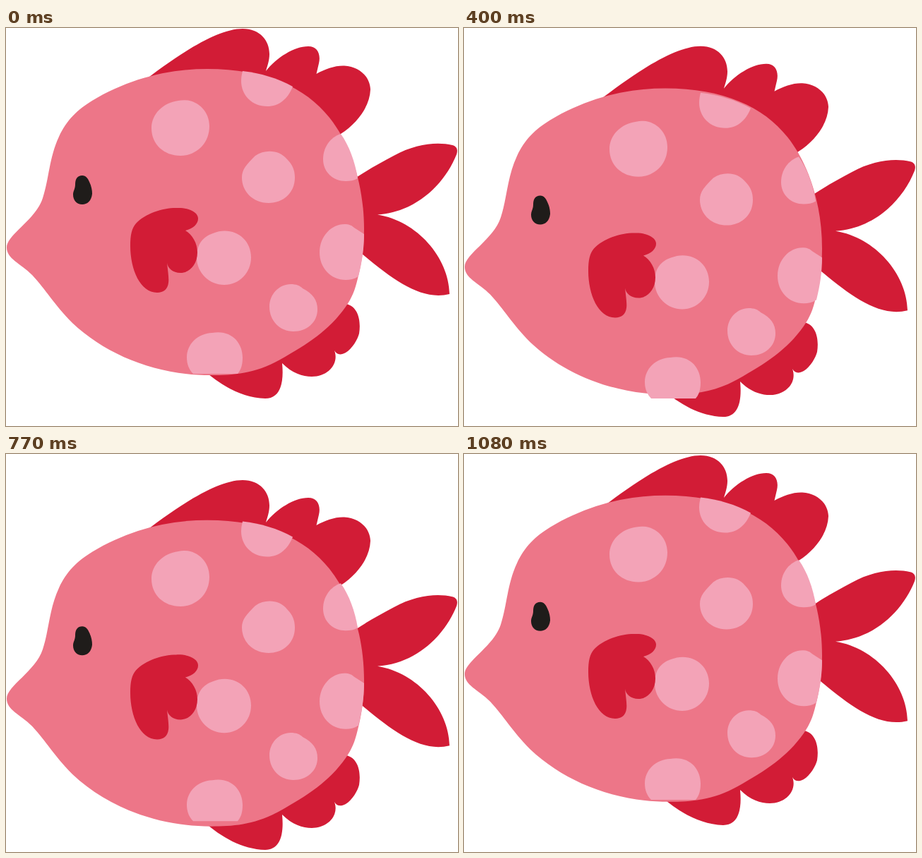
Write an HTML page that moves like this. It is 640 px wide and 564 px high and loops after 1.11 s.

```html
<!DOCTYPE html>
<html lang="en">
<head>
<meta charset="utf-8">
<title>Bobbing fish</title>
<style>
  html, body { margin: 0; width: 100%; height: 100%; overflow: hidden; background: #fff; }
  svg { display: block; width: 100%; height: 100%; }
  .fin { fill: #d21c36; }
  .body { fill: #ed7688; }
  .eye { fill: #1f1c1a; }
  .spot { fill: #f3a3b7; }
</style>
</head>
<body>
<!-- Parts run from back to front; the front one leads the motion. -->
<svg viewBox="0 0 640 564">
  <path class="fin" d="M480 222 L498 210.500 C514 200 532 190 549 181 C580 164 610 161 632 166 C639 168 640 173 638 179
    C621 222 580 261 526 264.500 C582 273.500 627 325 628 377 C588 387 548 357 504 320 L480 300Z"/>
  <path class="fin" d="M190 79 C240 40 298 1 335 1 C360 1 373 18 373 37 C373 46 370 54 368 61
    C383 42 408 26 428 26 C441 26 446 37 443 50 L439.500 65 C452 58 466 53 479 53.500
    C500 55 515 68 516 87 C515 112 497 135 474 150 L455 162 L380 150 L260 110Z"/>
  <path class="fin" d="M280 485 C305 507 334 524 367 525 C387 525 394 506 391 475
    C405 489 420 494 433 494 C456 494 472 476 465 457 C468 463 474 464 481 460
    C490 455 498 441 500 433 C503 413 498 395 482 391 L440 400 L300 465Z"/>
  <path class="body" d="M1 311 C1 293 42 272 52 241 C61 214 61 184 75 154 C86 130 101 116 122 103
    C172 73 228 58 285 58 C367 58 424 84 458 127 C489 166 507 224 507 285
    C507 312 503 336 498 355 C494 372 490 382 481 395 C457 429 427 448 388 470
    C352 490 322 492 290 492 C213 492 143 464 94 418 C66 389 58 373 37 350 C20 333 1 327 1 311Z"/>
  <path class="eye" d="M108 209 C113 209 116 213 118 218 C121 224 122 230 122 235 C121 245 115 250 108 250
    C100 250 95 244 95 236 C95 231 98 228 98 222 C98 214 101 209 108 209Z"/>
  <path class="spot" d="M244 103 C268 98 288 116 288 139 C288 165 268 181 247 181
    C224 181 206 165 206 142 C206 122 222 106 244 103Z"/>
  <path class="spot" d="M335 61 C360 64 385 71 406 83 C399 101 386 111 370 111
    C348 111 333 95 333 75 C333 70 334 65 335 61Z"/>
  <path class="spot" d="M353 181 C367 171 388 173 398 186 C406 194 409 202 409 212
    C409 234 392 248 372 248 C349 248 334 231 334 212 C334 200 341 193 353 181Z"/>
  <path class="spot" d="M474 150 C486 167 494 189 498 213 C493 216 487 217 481 217
    C463 217 449 204 449 186 C449 169 459 155 474 150Z"/>
  <path class="spot" d="M493 283 L507 292 C507 313 504 332 499 352 C493 356 487 357 481 357
    C460 357 444 340 444 318 C444 295 461 278 479 278 C486 278 490 280 493 283Z"/>
  <path class="spot" d="M403 363 C411 363 416 365 420 369 C434 376 441 385 441 399
    C441 417 426 430 407 430 C388 430 373 415 373 395 C373 377 387 363 403 363Z"/>
  <path class="spot" d="M293 291 C320 280 347 297 347 325 C347 347 330 364 309 364
    C288 364 270 347 270 325 C270 306 279 296 293 291Z"/>
  <path class="spot" d="M292 432 C318 427 335 445 335 467 C335 477 333 484 328 490 L265 490
    C259 484 256 476 256 467 C256 448 271 433 292 432Z"/>
  <path class="fin" d="M184 277 C197 263 221 255 241 255 C258 254 272 261 272 270 C272 278 265 284 254 287
    C264 293 271 305 271 318 C271 336 259 347 247 347 C236 347 229 340 228 333
    C229 343 231 355 230 361 C229 370 223 375 214 375 C190 375 176 342 176 309
    C176 293 178 284 184 277Z"/>
</svg>
<script>
  const LOOP = 1110, HALF = LOOP / 2, DROP = 39, LAG = 7.5, STEP = 33.69;
  const parts = [...document.querySelectorAll('path')];
  const start = performance.now();

  const easeInOut = (u, power) =>
    u < 0.5 ? (2 * u) ** power / 2 : 1 - (2 - 2 * u) ** power / 2;

  function drop(time) {
    const t = (time + LOOP) % LOOP;
    return DROP * (t < HALF ? easeInOut(t / HALF, 3) : 1 - easeInOut(t / HALF - 1, 2.8));
  }

  // Hold each pose for about a thirtieth of a second, on a 10 ms grid.
  function hold(time) {
    const tick = Math.floor((time + 1) / 10) * 10;
    const pose = Math.floor((tick + 5) / STEP);
    return Math.round(pose * STEP / 10) * 10;
  }

  function draw() {
    const t = hold((performance.now() - start) % LOOP);
    parts.forEach((part, i) => {
      const lag = (parts.length - 1 - i) * LAG;
      const y = drop(t - lag) - drop(-lag);
      part.setAttribute('transform', `translate(0 ${y.toFixed(2)})`);
    });
    requestAnimationFrame(draw);
  }
  draw();
</script>
</body>
</html>
```
